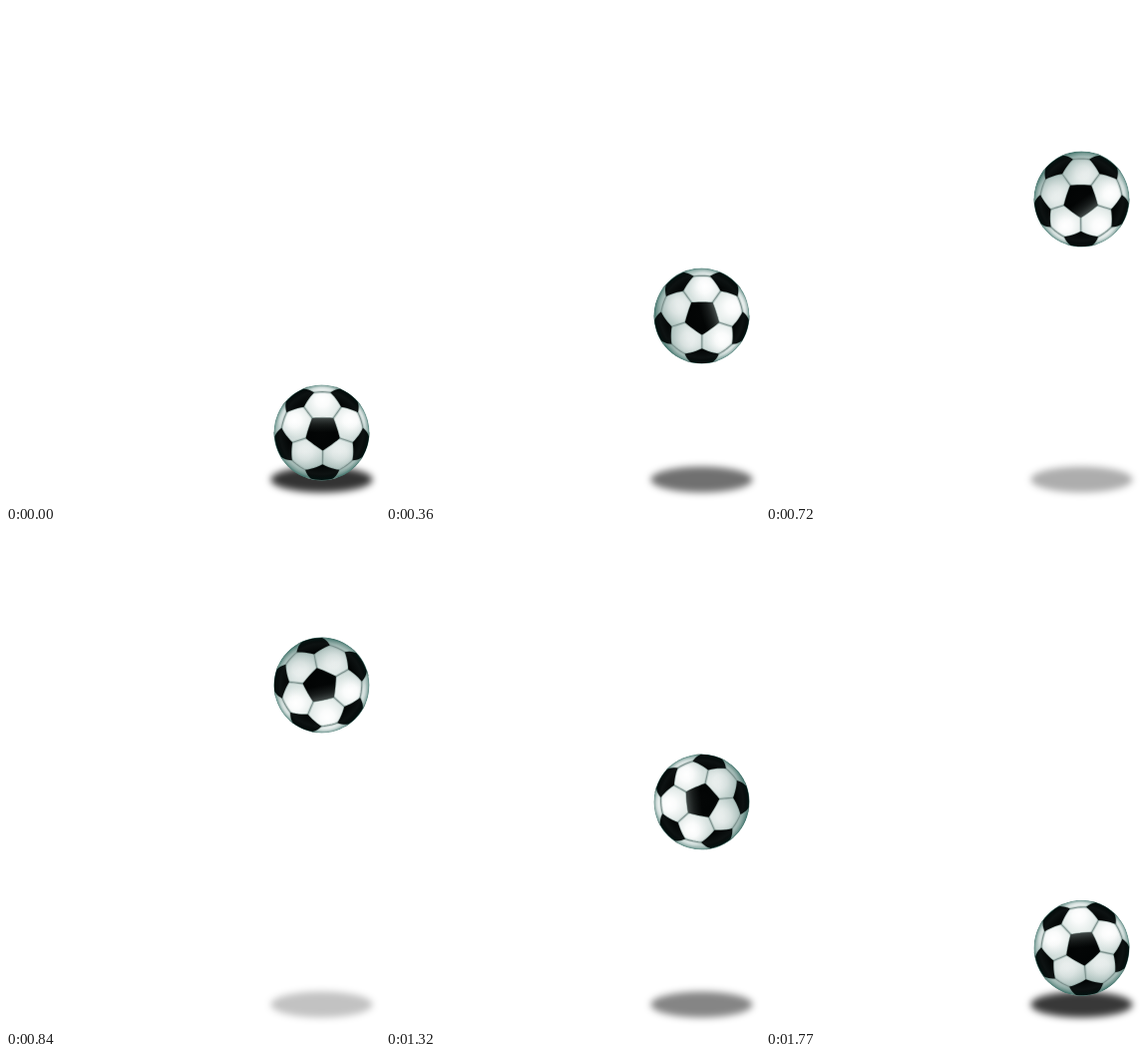
An HTML page with a canvas that plays this animation: 375 by 498 pixels, repeating every 1800 ms.

```html
<!DOCTYPE html>
<html lang="en">
<head>
<meta charset="utf-8">
<title>Bouncing ball</title>
<style>
html, body { margin: 0; width: 100%; height: 100%; overflow: hidden; background: #fff; }
canvas { display: block; width: 375px; height: 498px; }
</style>
</head>
<body>
<canvas id="stage" width="375" height="498"></canvas>
<script>
const ctx = document.getElementById('stage').getContext('2d');
const LOOP = 1800, STEP = 30, R = 48, CX = 316.5;
const TAU = Math.PI * 2;
const TILT = 0.025; // sideways lean of the pole
const CUT = 0.36;   // where a chord meets the corner of a black panel

function lean([x, y, z]) {
  const c = Math.cos(TILT), s = Math.sin(TILT);
  return [x * c + z * s, y, z * c - x * s];
}

// Icosahedron corners seen from above: pole, upper ring, lower ring
const ring = (z, turn) => Array.from({ length: 5 }, (_, k) => {
  const a = TAU / 4 + (k + turn) * TAU / 5, r = Math.sqrt(1 - z * z);
  return lean([r * Math.cos(a), r * Math.sin(a), z]);
});
const pole = lean([0, 0, 1]);
const upper = ring(1 / Math.sqrt(5), 0);
const lower = ring(-1 / Math.sqrt(5), 0.5);
const next = k => (k + 1) % 5, prev = k => (k + 4) % 5;

function mix(a, b, t) {
  const p = a.map((v, i) => v + (b[i] - v) * t);
  const n = Math.hypot(...p);
  return p.map(v => v / n);
}

// Points along the great circle between two directions, in pixels
function arc(a, b) {
  return Array.from({ length: 7 }, (_, i) => mix(a, b, i / 6).map(v => v * R));
}

const corner = (a, b) => mix(a, b, CUT);
function panel(center, around) {
  const corners = around.map(n => corner(center, n));
  const path = new Path2D();
  corners.forEach((c, i) => arc(c, corners[(i + 1) % 5])
    .forEach(p => path.lineTo(p[0], p[1])));
  path.closePath();
  return path;
}

const patches = [panel(pole, upper)];
const seams = new Path2D();
function seam(a, b, end = corner(b, a)) {
  arc(corner(a, b), end).forEach((p, i) =>
    i ? seams.lineTo(p[0], p[1]) : seams.moveTo(p[0], p[1]));
}
upper.forEach((u, k) => {
  const n = upper[next(k)], low = [lower[k], lower[prev(k)]];
  patches.push(panel(u, [pole, n, low[0], low[1], upper[prev(k)]]));
  seam(pole, u);
  seam(u, n);
  low.forEach(l => seam(u, l, mix(u, l, 0.5)));
});

function addStops(g, stops) {
  stops.forEach(([at, color]) => g.addColorStop(at, color));
  return g;
}
const radial = (x, y, r, stops, x2 = x, y2 = y) =>
  addStops(ctx.createRadialGradient(x, y, 0, x2, y2, r), stops);
const vertical = (y1, y2, stops) =>
  addStops(ctx.createLinearGradient(0, y1, 0, y2), stops);

function disc(x, y, r, fill) {
  ctx.fillStyle = fill;
  ctx.beginPath();
  ctx.arc(x, y, r, 0, TAU);
  ctx.fill();
}

// The light comes from the top of the ball and turns with it
const baseFill = radial(4, -14, R, [
  [0, '#eaf0ee'], [0.6, '#dfe8e6'], [0.85, '#d0dcda'], [0.96, '#adc4c0'], [1, '#76a09a']
], 0, 0);
const shadeFill = vertical(-10, R, [
  [0, 'rgba(40,90,80,0)'], [0.5, 'rgba(40,90,80,.1)'], [0.8, 'rgba(40,90,80,.24)'],
  [1, 'rgba(20,80,70,.5)']
]);
const patchFill = radial(0, 0, R, [
  [0, '#040606'], [0.36, '#020404'], [0.7, '#030606'], [0.87, '#0d1212'], [1, '#010606']
]);
const sheenFill = vertical(-16, 0, [
  [0, 'rgba(150,165,162,.5)'], [0.5, 'rgba(90,100,98,.25)'], [1, 'rgba(60,70,68,0)']
]);
const rimFill = radial(4, -8, R, [
  [0, 'rgba(0,60,50,0)'], [0.92, 'rgba(0,60,50,0)'], [1, 'rgba(0,60,50,.25)']
], 0, 0);
const glows = upper.map((u, k) => {
  const p = mix(mix(u, upper[next(k)], 0.5), pole, 0.36);
  const x = p[0] * R, y = p[1] * R - 3;
  return [x, y, radial(x, y, 17, [
    [0, '#fff'], [0.4, 'rgba(255,255,255,.85)'], [1, 'rgba(255,255,255,0)']
  ])];
});

function drawBall(y, angle) {
  ctx.save();
  ctx.translate(CX, y);
  ctx.rotate(angle);
  ctx.beginPath();
  ctx.arc(0, 0, R, 0, TAU);
  ctx.clip();
  disc(0, 0, R, baseFill);
  glows.forEach(([x, gy, fill]) => disc(x, gy, 17, fill));
  disc(0, 0, R, shadeFill);
  ctx.lineJoin = ctx.lineCap = 'round';
  ctx.strokeStyle = 'rgba(150,172,168,.4)';
  ctx.lineWidth = 3;
  ctx.stroke(seams);
  ctx.strokeStyle = '#7d918e';
  ctx.lineWidth = 1.1;
  ctx.stroke(seams);
  for (const p of patches) {
    ctx.strokeStyle = 'rgba(110,135,130,.5)';
    ctx.lineWidth = 1.6;
    ctx.stroke(p);
    ctx.fillStyle = patchFill;
    ctx.fill(p);
  }
  ctx.fillStyle = sheenFill;
  ctx.fill(patches[0]);
  disc(0, 0, R, rimFill);
  ctx.restore();
}

function drawShadow(alpha) {
  ctx.save();
  ctx.filter = 'blur(3.6px)';
  ctx.fillStyle = `rgba(0,0,0,${alpha})`;
  ctx.beginPath();
  ctx.ellipse(CX, 474.5, 51, 13, 0, 0, TAU);
  ctx.fill();
  ctx.restore();
}

function draw(now) {
  const t = Math.floor((now % LOOP) / STEP) * STEP / LOOP;
  const lift = 1 - Math.abs(1 - 2 * t);
  ctx.fillStyle = '#fff';
  ctx.fillRect(0, 0, 375, 498);
  drawShadow(0.8 - 0.6 * lift);
  drawBall(427.5 - 292.5 * lift, t * TAU);
}

const start = performance.now();
function tick() {
  draw(performance.now() - start);
  requestAnimationFrame(tick);
}
tick();
</script>
</body>
</html>
```
